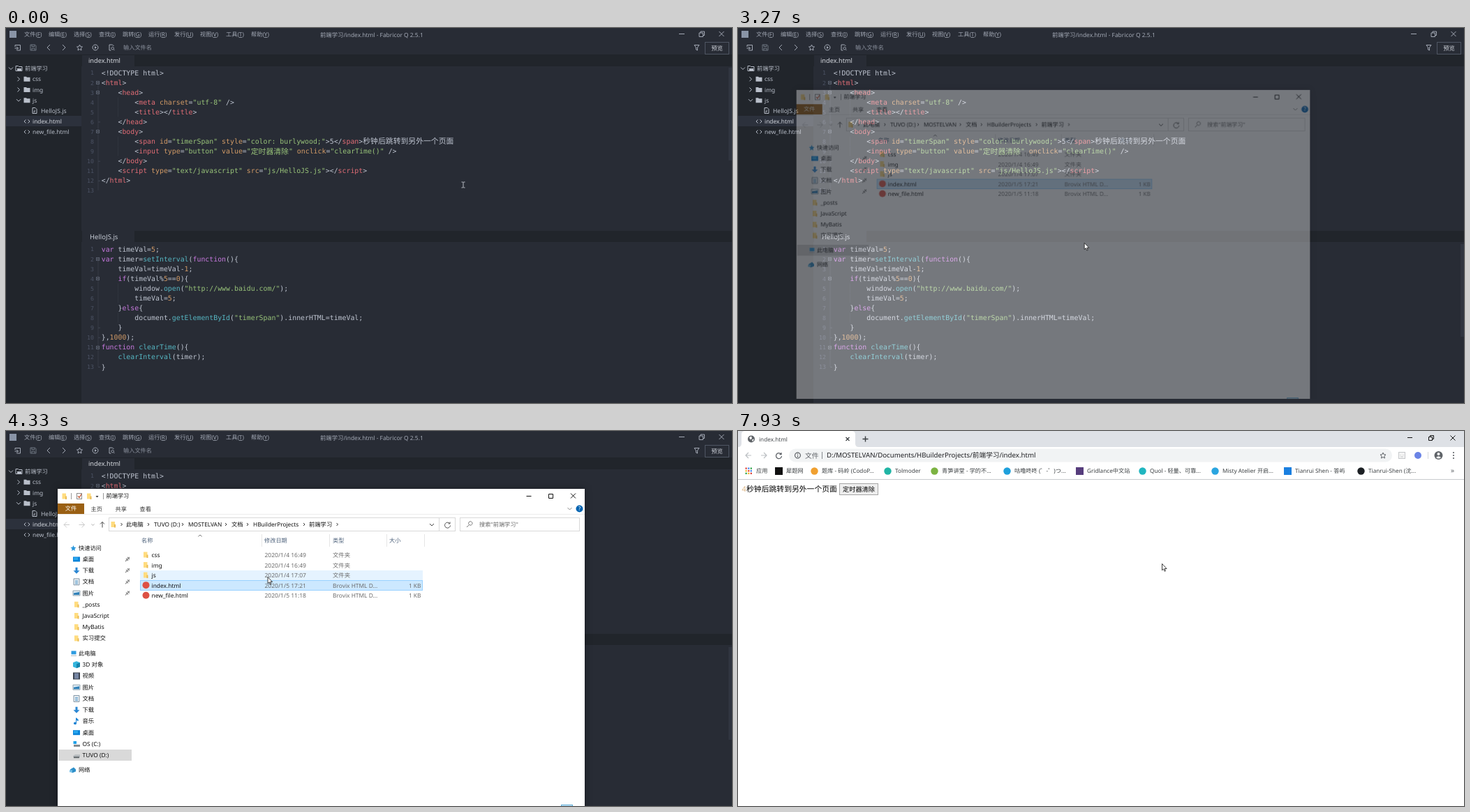
An HTML page with a canvas for the animation above (8 s loop, 1040 by 538 pixels).

```html
<!DOCTYPE html>
<html lang="zh-CN">
<head>
<meta charset="utf-8">
<style>
html, body { margin: 0; width: 100%; height: 100%; overflow: hidden; background: #282c35; }
canvas { display: block; }
</style>
</head>
<body>
<canvas id="stage" width="1040" height="538"></canvas>
<script>
const stage = document.getElementById('stage').getContext('2d');
const layer = stage.canvas.cloneNode().getContext('2d');
let ctx = stage;
const LOOP = 8000, STEP = 1000 / 15;
const UI = '"Noto Sans", "Noto Sans CJK SC", sans-serif';
const MONO = '"DejaVu Sans Mono", "Noto Sans CJK SC", monospace';
const GREY = '#a3a9b5';

// ---------- helpers ----------
function text(s, x, y, size = 8.2, color = '#111', align = 'left', family = UI) {
  ctx.font = `${size}px ${family}`;
  ctx.textAlign = align;
  ctx.fillStyle = color;
  ctx.fillText(s, x, y + size * 0.36);
  return ctx.measureText(s).width;
}
function rect(x, y, w, h, fill, stroke) {
  if (fill) { ctx.fillStyle = fill; ctx.fillRect(x, y, w, h); }
  if (stroke) { ctx.strokeStyle = stroke; ctx.lineWidth = 1; ctx.strokeRect(x + .5, y + .5, w - 1, h - 1); }
}
function shape(d, x, y, fill, stroke, width = 1) {
  ctx.save();
  ctx.translate(x, y);
  const path = new Path2D(d);
  if (fill) { ctx.fillStyle = fill; ctx.fill(path); }
  if (stroke) { ctx.strokeStyle = stroke; ctx.lineWidth = width; ctx.stroke(path); }
  ctx.restore();
}
const line = (d, x, y, color, width) => shape(d, x, y, null, color, width);
function dot(x, y, r, fill) {
  ctx.beginPath(); ctx.arc(x, y, r, 0, 7); ctx.fillStyle = fill; ctx.fill();
}
// Label followed by an underlined access key in brackets
function keyed(label, key, x, y, color, tail = '') {
  const start = x + text(label + '(', x, y, 8.2, color);
  const w = text(key, start, y, 8.2, color);
  text(')' + tail, start + w, y, 8.2, color);
  rect(start, y + 4, w, .8, color);
}

const RIGHT = 'M-1.5-3L1.5 0-1.5 3', DOWN = 'M-3-1.5L0 1.5 3-1.5', CROSS = 'M-3.5-3.5L3.5 3.5M3.5-3.5L-3.5 3.5';
const STAR = 'M0-4L1.2-1.3 4-1 1.9 1 2.5 4 0 2.5-2.5 4-1.9 1-4-1-1.2-1.3Z';
const RELOAD = 'M3-2A4 4 0 1 0 4 1M3.5-4V-1.5H1';
const BACK = 'M4 0H-4M0-4L-4 0 0 4', FORWARD = 'M-4 0H4M0-4L4 0 0 4';
const ICONS = {
  folder: [['M-3-4H2.5V4H-3Z', '#ffdc7f'], ['M1.5 0H3.5V4.5H1.5Z', '#e9bb56']],
  quick: [[STAR, '#2a97dc']],
  desktop: [['M-5-3.5H5V3.5H-5Z', '#0b83d8'], ['M-4-2.5H2V1H-4Z', '#29a8ef']],
  down: [['M-1.5-4.5H1.5V0H4.5L0 4.5-4.5 0H-1.5Z', '#2b87d3']],
  doc: [['M-4-4.5H4V4.5H-4Z', '#e9eef2', '#8396a5'], ['M-2-2H2V-1H-2ZM-2 0H2V1H-2ZM-2 2H2V3H-2Z', '#5a9bc9']],
  picture: [['M-5-3.5H5V3.5H-5Z', '#dcebf5', '#92a5b1'], ['M-4 2.5V0L4-1.5V2.5Z', '#2f80b8']],
  pc: [['M-4-3.5H3V1.5H-4Z', '#2d9be0'], ['M-4.5 3H3.5V4H-4.5Z', '#b3bcc2']],
  cube: [['M0-5L5-3V3L0 5-5 3V-3Z', '#35b5dd'], ['M0-1L5-3V3L0 5Z', '#1584ad']],
  video: [['M-5-5H5V5H-5Z', '#3c4450'], ['M-3-4H3V4H-3Z', '#7787a5']],
  music: [['M-1-5H0L3-2 2 0 0-2V3A2 1.7 0 1 1-1 1.5Z', '#1c83d4']],
  disk: [['M-5 1L-2-1H5V2L3 4H-4Z', '#b5babd'], ['M-4 2H4V4H-4Z', '#62686c']],
  system: [['M-4 1H5V4H-4Z', '#83898d'], ['M-4.5-4H0V0H-4.5Z', '#1ea1e8']],
  net: [['M-4-1L1-4 4-1V2L-1 4-4 2Z', '#2d8fc9'], ['M-5 0H-1V3H-5Z', '#73bfe8']]
};
const icon = (name, x, y) => ICONS[name].forEach(([d, f, s]) => shape(d, x, y, f, s));

// ---------- code editor ----------
const PALETTE = { w: '#bfc5d1', r: '#e06c75', o: '#d19a66', g: '#98c379', p: '#c678dd', c: '#56b6c2' };
const HTML_CODE = [
  '<!DOCTYPE html>', '<~rhtml~w>', '    <~rhead~w>',
  '        <~rmeta ~ocharset~w=~g"utf-8"~w />',
  '        <~rtitle~w></~rtitle~w>', '    </~rhead~w>', '    <~rbody~w>',
  '        <~rspan ~oid~w=~g"timerSpan" ~ostyle~w=~g"color: burlywood;"~w>5</~rspan~w>秒钟后跳转到另外一个页面',
  '        <~rinput ~otype~w=~g"button" ~ovalue~w=~g"定时器清除" ~oonclick~w=~g"clearTime()"~w />',
  '    </~rbody~w>',
  '    <~rscript ~otype~w=~g"text/javascript" ~osrc~w=~g"js/HelloJS.js"~w></~rscript~w>',
  '</~rhtml~w>', ''
];
const JS_CODE = [
  '~pvar~w timeVal=~o5~w;', '~pvar~w timer=~csetInterval~w(~pfunction~w(){',
  '    timeVal=timeVal-~o1~w;', '    ~pif~w(timeVal%~o5~w==~o0~w){',
  '        window.~copen~w(~g"http://www.baidu.com/"~w);', '        timeVal=~o5~w;',
  '    }~pelse~w{', '        document.~cgetElementById~w(~g"timerSpan"~w).innerHTML=timeVal;',
  '    }', '},~o1000~w);', '~pfunction ~cclearTime~w(){', '    ~cclearInterval~w(timer);', '}'
];
const PITCH = 14.08;

function code(lines, top, folds, ends) {
  rect(131.5, top + PITCH, 1, PITCH * 11, '#343944');
  lines.forEach((source, i) => {
    const y = top + i * PITCH, n = i + 1;
    text(n, 126, y + .5, 8.3, '#4b5263', 'right', MONO);
    if (folds.includes(n)) {
      rect(129, Math.round(y) - 2, 5, 5, '#282c35', '#59606e');
      rect(130.5, Math.round(y), 2, 1, '#777e8b');
    }
    if (ends.includes(n)) rect(132, y, 3, 1, '#3f4551');
    if (source.startsWith('        ')) rect(160, y - 7, 1, PITCH, '#2f343e');
    let x = 136.7;
    for (const part of ('~w' + source).split('~').slice(1))
      for (const run of part.slice(1).split(/([\u4e00-\u9fff]+)/))
        if (run) x += text(run, x, y, run[0] > '\u4e00' ? 10.85 : 9.89, PALETTE[part[0]], 'left', MONO);
  });
}

const TOP_MENU = [['文件', 'F', 26], ['编辑', 'E', 61], ['选择', 'S', 97], ['查找', 'I', 133], ['跳转', 'G', 167],
  ['运行', 'R', 204], ['发行', 'U', 241], ['视图', 'V', 278], ['工具', 'T', 315], ['帮助', 'Y', 351]];
const FOLDER = 'M-4.5-3.5H-1L0-2.5H4.5V3.5H-4.5Z', TAGS = 'M-1.5-2.5L-4 0-1.5 2.5M1.5-2.5L4 0 1.5 2.5';

function editor(t) {
  rect(0, 0, 1040, 538, '#282c35');
  rect(0, 38, 1040, 1, '#20242a');
  rect(0, 39, 108, 499, '#21252b');
  for (const y of [39, 291]) {
    rect(108, y, 932, 16, '#21252b');
    rect(109, y, 75, 16, '#282c35');
  }
  // title bar and toolbar
  rect(5, 4, 10, 10, '#8994a6');
  TOP_MENU.forEach(([label, key, x]) => keyed(label, key, x, 9, GREY));
  text('前端学习/index.html - Fabricor Q 2.5.1', 450, 9.5, 8.4, GREY);
  line('M-4 0H4', 968, 8.5, GREY);
  line('M-3.5-1.5H2V4H-3.5ZM-1.5-1.5V-3.5H4V2H2', 996.5, 8.5, GREY);
  line(CROSS, 1025, 8.5, GREY);
  line('M-3.5-1V-3.5H4V4H-1M-4 1H1M-1.5-1.5L1 1-1.5 3.5', 16.5, 28, GREY);
  line('M-4-4H2.5L4-2.5V4H-4ZM-2-4V-1.5H2V-4M-2 4V1H2V4', 39, 28, '#6d7480');
  line('M2-4L-2 0 2 4', 61, 28, GREY);
  line('M-2-4L2 0-2 4', 83, 28, GREY);
  line(STAR, 105.5, 28, GREY);
  line('M4 0A4 4 0 1 1 4-.1Z', 128, 28, GREY);
  shape('M-1-2L2 0-1 2Z', 128, 28, GREY);
  line('M-1 4H-3.5V-4H1L3-2M4 4L2.5 2.5M3 1.2A1.8 1.8 0 1 1 3 1Z', 151.5, 28, GREY);
  text('输入文件名', 168, 28.5, 8.2, '#8b919d');
  line('M-3.5-3.5H3.5L1 0V4L-1 3V0Z', 989.5, 28, GREY);
  rect(1001, 20, 35, 18, null, '#4f5663');
  text('预览', 1018.5, 29, 8.4, '#cfd3db', 'center');
  // project tree
  rect(0, 126, 108, 15, '#2c313c');
  const label = '#b9bfca';
  line(DOWN, 7, 58, label);
  line(FOLDER, 18.5, 58, label);
  rect(16, 58, 6, 3, label);
  text('前端学习', 27, 58.5, 8.2, label);
  ['css', 'img', 'js'].forEach((name, i) => {
    const y = 73.3 + i * 15.2;
    line(i < 2 ? RIGHT : DOWN, 18, y, label);
    shape(FOLDER, 30, y, label);
    text(name, 38, y, 8.4, label);
  });
  line('M-3-4H1L3-2V4H-3ZM0-1V2H-1.5', 41, 118.5, label);
  text('HelloJS.js', 50, 119, 8.6, label);
  line(TAGS, 30, 134, label);
  text('index.html', 38, 134, 8.4, '#d5d9e1');
  line(TAGS, 30, 149, label);
  text('new_file.html', 38, 149, 8.4, label);
  // panes
  text('index.html', 118, 46.5, 9.2, '#d7dae0');
  text('HelloJS.js', 120, 300, 9.5, '#c7ccd6');
  code(HTML_CODE, 64, [2, 3, 7], [6, 10, 12]);
  code(JS_CODE, 317, [2, 4, 11], [9, 10, 13]);
  if (t < 930) rect(1035, 57, 5, 133, '#303540');
  if (t >= 2500 && t < 5500) rect(1035, 310, 5, 133, '#303540');
  if ((t >= 395 && t < 900) || (t >= 2325 && t < 2830)) rect(136, 226, 1, 14, '#c6ccd8');
}

// ---------- context menu ----------
const CONTEXT = [
  ['复制选区或当前行', 'C', 'Ctrl+C'], ['剪切选区或当前行', 'T', 'Ctrl+X'], ['粘贴', 'P', 'Ctrl+V'], ['删除行', 'L', 'Ctrl+D'], null,
  ['转到定义', 'D', 'Alt+D', '【Alt+鼠标单击】'], ['选择相同变量', 'S', 'Ctrl+Shift+E'], null,
  ['复制文件路径', 'L', 'Ctrl+Shift+C'], ['打开文件所在目录', 'I', ''], ['使用命令行窗口打开所在目录', 'U', ''], ['在项目管理器中定位', 'H', ''], null,
  ['激活代码助手', 'A', 'Alt+/'], ['显示文档结构图', 'O', 'Alt+W'], ['重排代码格式', 'F', 'Ctrl+K'], ['注释/反注释', '/', 'Ctrl+/'], ['块注释', 'B', 'Ctrl+Shift+/'], null,
  ['本地历史记录', 'Y', 'Ctrl+Shift+H'], null, ['外部命令/插件', 'E', '']
];
function contextMenu(pointerY) {
  rect(654, 225, 205, 313, '#353b45');
  let y = 235.3;
  for (const item of CONTEXT) {
    if (!item) {
      rect(660, Math.round(y - 5), 193, 1, '#656b75');
      y += 7;
      continue;
    }
    const [label, key, shortcut, tail] = item;
    if (Math.abs(pointerY - y) < 8.1) rect(654, Math.round(y - 8), 205, 16, '#2c313a');
    keyed(label, key, 672.5, y, '#d0d4dc', tail);
    text(shortcut, 789, y, 8.7, '#d0d4dc');
    y += 16.25;
  }
  line('M-2-3.5L2 0-2 3.5', 849, 530, '#d0d4dc', 1.3);
}

// ---------- file window ----------
const QUICK = [['desktop', '桌面'], ['down', '下载'], ['doc', '文档'], ['picture', '图片'],
  ['folder', '_posts'], ['folder', 'JavaScript'], ['folder', 'MyBatis'], ['folder', '实习提交']];
const DRIVES = [['cube', '3D 对象'], ['video', '视频'], ['picture', '图片'], ['doc', '文档'], ['down', '下载'],
  ['music', '音乐'], ['desktop', '桌面'], ['system', 'OS (C:)'], ['disk', 'TUVO (D:)']];
const CRUMBS = [['此电脑', 172], ['TUVO (D:)', 212], ['MOSTELVAN', 261], ['文档', 323], ['HBuilderProjects', 354], ['前端学习', 434]];
const FILES = [['css', '4 16:49'], ['img', '4 16:49'], ['js', '4 17:07'], ['index.html', '5 17:21'], ['new_file.html', '5 11:18']];

function fileWindow(open, pointer) {
  ctx.shadowColor = 'rgba(0,0,0,.35)';
  ctx.shadowBlur = 10;
  rect(74, 83, 755, 475, '#fff');
  ctx.shadowColor = 'transparent';
  // caption and ribbon
  icon('folder', 83.5, 93.5);
  icon('folder', 119, 93.5);
  rect(93, 89, 1, 9, '#999');
  rect(139, 89, 1, 9, '#999');
  rect(101, 89, 8, 9, '#fff', '#8b8b8b');
  line('M-2 0L0 2 3-3', 105, 93.5, '#c4512d', 1.2);
  shape('M-2-1H2L0 1.5Z', 130.5, 94, '#333');
  text('前端学习', 143.5, 93.5);
  line('M-3.5 0H3.5', 749, 93.5, '#111');
  line('M-3-3H3V3H-3Z', 780.5, 93.5, '#111');
  line(CROSS, 812.5, 93, '#111');
  rect(74, 104, 38, 15, '#9a6014');
  text('文件', 93, 111.5, 8.2, '#fff', 'center');
  ['主页', '共享', '查看'].forEach((s, i) => text(s, 121.5 + i * 35, 112, 8.2, '#333'));
  line(DOWN, 807.5, 111.5, '#888');
  dot(821.5, 111.5, 5, '#0063b1');
  text('?', 821.5, 111.5, 8, '#fff', 'center');
  rect(74, 119, 755, 1, '#ececec');
  // address bar
  line(BACK, 87, 134.5, '#ccc');
  line(FORWARD, 108.5, 134.5, '#ccc');
  line('M-2-1L0 1 2-1', 124.5, 134.5, '#aaa');
  line('M0 4V-4M-3-1L0-4 3-1', 138, 134.5, '#444');
  rect(147, 124, 497, 20, '#fff', '#d9d9d9');
  rect(620, 124, 1, 20, '#d9d9d9');
  rect(650, 124, 172, 20, '#fff', '#d9d9d9');
  icon('folder', 153.5, 134);
  [165.5, 204, 253, 315, 346, 427, 474.5].forEach(x => line('M-1-2L1 0-1 2', x, 134, '#333'));
  CRUMBS.forEach(([s, x]) => text(s, x, 134.3, 8.3));
  line(DOWN, 610, 134.5, '#444');
  line(RELOAD, 632.5, 134.5, '#444', .9);
  line('M-4 4L-1 1M4-1.5A2.7 2.7 0 1 1 4-1.6Z', 664, 134, '#777');
  text('搜索"前端学习"', 678, 134.5, 8.2, '#666');
  // navigation pane
  icon('quick', 96.5, 168);
  text('快速访问', 104, 168);
  QUICK.forEach(([name, s], i) => {
    const y = 184 + i * 16.2;
    icon(name, 101, y);
    text(s, 109.5, y, 8.4);
    if (i < 4) line('M3-3L-3 3M0-3L3 0M-2-1L1 2', 174, y, '#858585', 1.2);
  });
  rect(75, open ? 457 : 311, 105, 16, '#d9d9d9');
  icon('pc', 97.5, 319);
  text('此电脑', 104, 319);
  if (open) DRIVES.forEach(([name, s], i) => {
    icon(name, 101, 335.2 + i * 16.25);
    text(s, 109.5, 335.2 + i * 16.25, 8.4);
  });
  const netY = open ? 486.5 : 340.5;
  icon('net', 96, netY);
  text('网络', 104, netY);
  // file list
  [['名称', 194], ['修改日期', 370], ['类型', 468], ['大小', 549]].forEach(([s, x]) => text(s, x, 157, 8.2, '#4c607a'));
  [366, 463, 545, 599].forEach(x => rect(x, 148, 1, 18, '#e5e5e5'));
  line('M-2.5 1L0-1.5 2.5 1', 278, 150.5, '#777');
  FILES.forEach(([name, date], i) => {
    const y = 178 + i * 14.55, isFolder = i < 3;
    const top = Math.round(y - 7.5), over = pointer.x > 192 && pointer.x < 597 && Math.abs(pointer.y - y) < 7.2;
    if (i === 3) rect(192, top, 405, 15, '#cce8ff', '#99d1ff');
    else if (over) rect(192, top, 405, 15, '#e5f3ff');
    if (isFolder) icon('folder', 200, y - .5);
    else dot(200.5, y - .5, 5, '#dd5144');
    text(name, 208.5, y, 8.4);
    text('2020/1/' + date, 370.5, y, 8.5, '#6d6d6d');
    text(isFolder ? '文件夹' : 'Brovix HTML D...', 468, y, 8.4, '#6d6d6d');
    if (!isFolder) text('1 KB', 594.5, y, 8.4, '#6d6d6d', 'right');
  });
  rect(795, 536, 17, 10, '#cce8f7', '#5aa9d6');
}

// The window is composed on its own layer, so that it fades in as one piece
function explorer(t, pointer) {
  const left = Math.max(0, 1 - (t - 3200) / 270) ** 1.57;
  const scale = 1 - 0.04 * left;
  layer.clearRect(0, 0, 1040, 538);
  ctx = layer;
  fileWindow(t >= 3465, pointer);
  ctx = stage;
  ctx.globalAlpha = 1 - left;
  ctx.drawImage(layer.canvas, 451.5 * (1 - scale), 310 * (1 - scale), 1040 * scale, 538 * scale + 310 * (1 - scale) * 0);
  ctx.globalAlpha = 1;
}

// ---------- browser ----------
const BOOKMARKS = [
  ['犀题网', 69, '#111'], ['题库 - 码岭 (CodoP...', 120, '#f0a030'], ['Tolmoder', 225, '#20b5a5'],
  ['青笋讲堂 - 学的不...', 292, '#7cb342'], ['咕噜咚咚 (゜-゜)つ...', 396, '#1ea0dc'], ['Gridlance中文站', 500, '#563d7c'],
  ['Quol - 轻量、可靠...', 590, '#20b6c0'], ['Misty Atelier 开启...', 694, '#2aa5e0'],
  ['Tianrui Shen - 答屿', 798, '#1a7fe0'], ['Tianrui-Shen (沈...', 903, '#1b1f23']
];
function browser(t) {
  rect(0, 0, 1040, 538, '#fff');
  if (t < 6265) return;
  const ink = '#5f6368';
  rect(0, 0, 1040, 23, '#dee1e6');
  shape('M0 23Q5 23 5 18V5Q5 0 10 0H163Q168 0 168 5V18Q168 23 173 23Z', 0, 0, '#fff');
  line('M-2.5-2.5L2.5 2.5M2.5-2.5L-2.5 2.5', 157, 11.5, '#3c4043', 1.3);
  line('M-4 0H4M0-4V4', 182.5, 11.5, '#3c4043', 1.4);
  line('M-3.5 0H3.5', 962.5, 9.5, '#111');
  line('M-3.5-1.5H1.5V3.5H-3.5ZM-1.5-1.5V-3.5H3.5V1.5H1.5', 993, 10, '#111');
  line(CROSS, 1024, 10, '#111');
  line(BACK, 15, 35, '#bcbfc3', 1.2);
  line(FORWARD, 37, 35, '#bcbfc3', 1.2);
  line(RELOAD, 58.5, 35, ink, 1.3);
  ctx.beginPath();
  ctx.roundRect(73, 25.5, 864, 19, 9.5);
  ctx.fillStyle = '#f1f3f4';
  ctx.fill();
  line(STAR, 924, 35, ink);
  rect(946, 30, 10, 10, '#f4f4f4', '#c5c7ca');
  line('M-2-1V0M2-1V0M-2 2H2', 951, 35, '#c5c7ca');
  dot(974, 35, 5, '#6b84e6');
  rect(988, 30, 1, 10, '#d6d8db');
  dot(1003.5, 35, 6, ink);
  dot(1003.5, 33, 2, '#fff');
  shape('M-3.5 3Q0-.5 3.5 3Q0 6-3.5 3Z', 1003.5, 35, '#fff');
  [-4, 0, 4].forEach(d => dot(1025, 35 + d, 1.1, ink));
  rect(0, 69, 1040, 1, '#c9cbce');
  if (t >= 6395) {
    line('M4 0A4 4 0 1 1 4-.1ZM0-2.5V-1M0 0V2.5', 85.5, 35, ink, 1.2);
    text('文件', 96, 35, 9.8, ink);
    rect(120, 30, 1, 10, '#85898d');
    text('D:/MOSTELVAN/Documents/HBuilderProjects/前端学习/index.html', 127, 35, 9.7, '#202124');
  }
  if (t < 6595) return;
  dot(19, 11.5, 5, ink);
  shape('M-3-2L0-4 1-1-1 1ZM1 1L4 0 2 4Z', 19, 11.5, '#fff');
  text('index.html', 30, 12, 8.2, '#45494d');
  for (let i = 0; i < 9; i++)
    rect(10.5 + i % 3 * 3.6, 52.5 + Math.floor(i / 3) * 3.6, 2.3, 2.3, ['#e04a3f', '#4a8cf0', '#35a853', '#f5b82e'][i % 4]);
  text('应用', 26, 57.5, 8.2, '#3c4043');
  BOOKMARKS.forEach(([s, x, color], i) => {
    if ([0, 5, 8].includes(i)) rect(x - 16, 52, 11, 11, color);
    else dot(x - 10.5, 57.5, 5.2, color);
    text(s, x, 57.5, 8.2, '#3c4043');
  });
  text('»', 1021, 56.5, 10, ink);
  text(t < 7525 ? '5' : '4', 5.5, 83.5, 10.8, '#deb887');
  text('秒钟后跳转到另外一个页面', 12, 83.5, 10.83, '#000');
  rect(145, 75, 56, 17, '#eeeeee', '#a6a6a6');
  text('定时器清除', 173, 84, 9.2, '#000', 'center');
}

// ---------- pointer ----------
const TRACK = [[0, 655, 225], [400, 655, 225], [930, 684, 344], [1000, 684, 344], [1400, 681, 374], [1533, 681, 374],
  [2000, 685, 361], [2600, 685, 361], [3000, 508, 318], [3133, 508, 318], [3200, 502.5, 313], [3400, 483.5, 299],
  [3467, 475.5, 293], [3867, 384, 200], [4200, 384, 200], [4467, 366, 219], [5000, 366, 219], [5267, 367, 217.5],
  [5467, 367, 219], [5667, 360, 218], [6000, 360, 218], [6067, 360, 216], [6867, 361, 215], [7067, 375, 218],
  [7733, 375, 218], [7933, 607.5, 190.5], [8000, 607.5, 190.5]];

function locate(t) {
  const i = TRACK.findIndex(k => k[0] > t);
  const [t0, x0, y0] = TRACK[i - 1], [t1, x1, y1] = TRACK[i];
  const u = (t - t0) / (t1 - t0);
  return { x: x0 + (x1 - x0) * u, y: y0 + (y1 - y0) * u };
}
function drawPointer(t, { x, y }) {
  const busy = (t >= 5595 && t < 6060) || (t >= 6260 && t < 6660);
  if (t < 395) line('M-2.5-4H-.5L0-3.5.5-4H2.5M0-3.5V3.5M-2.5 4H-.5L0 3.5.5 4H2.5', x, y, '#c8ccd4', .9);
  else if (busy) {
    dot(x, y, 5.8, '#1683d8');
    dot(x, y, 2.8, '#eaf6fd');
    const a = t / 160;
    ctx.beginPath();
    ctx.arc(x, y, 4.2, a, a + 1.6);
    ctx.strokeStyle = '#58b5f0';
    ctx.lineWidth = 1.8;
    ctx.stroke();
  } else shape('M0 0V9.3L2.1 7.4 3.6 10.8 5 10.2 3.6 7H6.6Z', x, y, '#fff', '#111', .8);
}

function frame(now) {
  const t = Math.floor(((now % LOOP) + 4) / STEP) * STEP % LOOP;
  const pointer = locate(t);
  stage.textRendering = layer.textRendering = 'geometricPrecision';
  if (t < 5865) {
    editor(t);
    if (t >= 395 && t < 2325) contextMenu(pointer.y);
    if (t > 3205) explorer(t, pointer);
  } else browser(t);
  drawPointer(t, pointer);
  requestAnimationFrame(frame);
}
frame(0);
</script>
</body>
</html>
```
